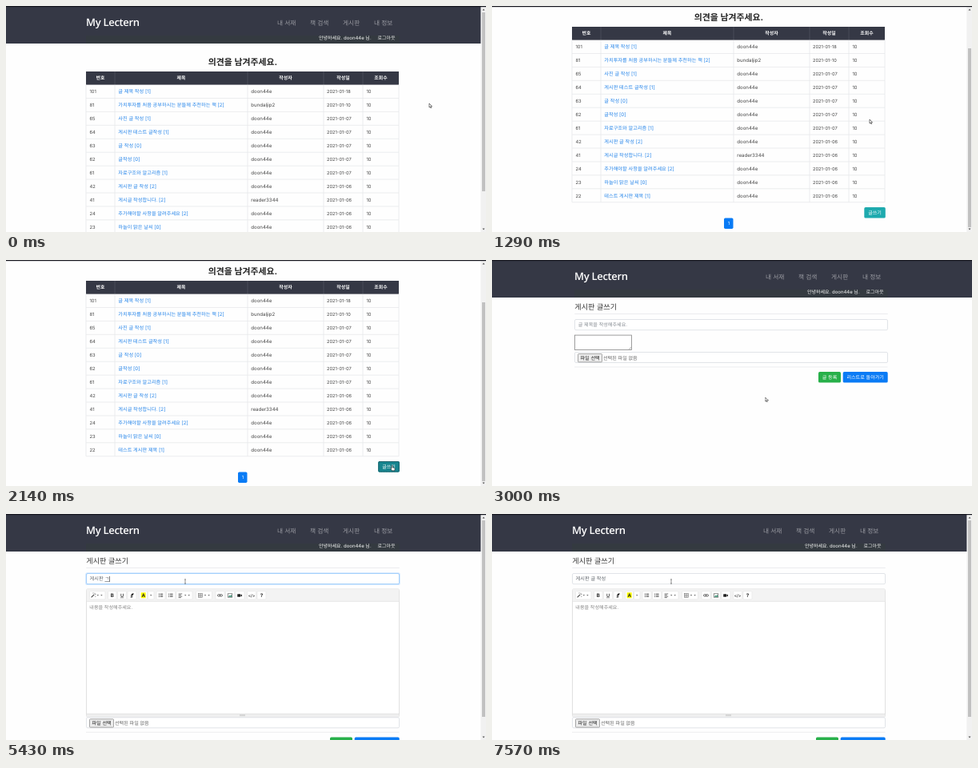
An HTML page for the animation above (8000 ms loop, 600 px wide and 283 px high).

```html
<!DOCTYPE html>
<html lang="ko">
<head>
<meta charset="utf-8">
<title>게시판 글쓰기</title>
<style>
html, body { margin: 0; width: 100%; height: 100%; overflow: hidden; background: #fefefe; }
svg { display: block; width: 600px; height: 283px; }
text {
  font-family: Inter, "Noto Sans CJK KR", "Noto Sans CJK", "Noto Sans KR", sans-serif;
  text-rendering: geometricPrecision;
  white-space: pre;
}
.brand { font-family: "Open Sans", "Noto Sans", sans-serif; font-weight: 600; letter-spacing: -.3px; }

/* 56 steps per loop; the small negative delay keeps each change on time */
.anim, .scene { animation: 8s step-end -5ms infinite; }
#list { animation-name: list; }
#plain { animation-name: plain; }
#editor { animation-name: editor; }
#page { animation-name: scroll; }
#thumb { animation-name: thumb; }
#hover { animation-name: hover; }
#focus { animation-name: focus; }
#bodyCaret { animation-name: bodyCaret; }
#pointer { animation-name: move; }
#arrow { animation-name: arrow; }
#hand { animation-name: hand; }
#beam { animation-name: beam; }

@keyframes list { 0% { opacity: 1 } 33.929%, 100% { opacity: 0 } }
@keyframes plain { 0% { opacity: 0 } 33.929% { opacity: 1 } 41.071%, 100% { opacity: 0 } }
@keyframes editor { 0% { opacity: 0 } 41.071%, 100% { opacity: 1 } }
@keyframes scroll {
  0% { transform: translateY(0) }
  10.714% { transform: translateY(0); animation-timing-function: steps(3) }
  16.071%, 100% { transform: translateY(-56px) }
}
@keyframes thumb {
  0% { transform: translateY(0) }
  10.714% { transform: translateY(0); animation-timing-function: steps(3) }
  16.071%, 100% { transform: translateY(45px) }
}
@keyframes hover { 0% { opacity: 0 } 25% { opacity: 1 } 33.929%, 100% { opacity: 0 } }
@keyframes focus {
  0% { opacity: 0 } 44.643% { opacity: 1 }
  87.5% { opacity: .7 } 89.286% { opacity: .3 } 91.071%, 100% { opacity: 0 }
}
@keyframes bodyCaret { 0% { opacity: 0 } 87.5% { opacity: 1 } 94.643%, 100% { opacity: 0 } }
@keyframes move {
  0% { transform: translate(529px, 122px); animation-timing-function: steps(7) }
  12.5% { transform: translate(472px, 142px) }
  16.071% { transform: translate(472px, 142px); animation-timing-function: steps(5) }
  25% { transform: translate(482px, 257px) }
  28.571% { transform: translate(482px, 257px); animation-timing-function: steps(5) }
  37.5% { transform: translate(341.5px, 172px); animation-timing-function: steps(4) }
  44.643%, 100% { transform: translate(224px, 84.5px) }
}
@keyframes arrow {
  0% { opacity: 1 } 25% { opacity: 0 } 30.357% { opacity: 1 } 44.643%, 100% { opacity: 0 }
}
@keyframes hand { 0% { opacity: 0 } 25% { opacity: 1 } 30.357%, 100% { opacity: 0 } }
@keyframes beam { 0% { opacity: 0 } 44.643%, 100% { opacity: 1 } }
</style>
</head>
<body>
<svg id="stage" viewBox="0 0 600 283"></svg>
<script>
const DARK = '#353845', BLUE = '#0a7bf5', GREEN = '#28b04a', LINE = '#e4e5e8', FIELD = '#dadee2';
const USER = 'doon44e';

const rect = (x, y, w, h, fill, more = '') =>
  `<rect x="${x}" y="${y}" width="${w}" height="${h}" fill="${fill}" ${more}/>`;
const text = (x, y, s, size = 6.1, fill = '#444', more = '') =>
  `<text x="${x}" y="${y}" font-size="${size}" fill="${fill}" ${more}>${s}</text>`;
const path = (d, stroke, more = '') => `<path d="${d}" fill="none" stroke="${stroke}" ${more}/>`;
const mid = 'text-anchor="middle"';
const box = (x, y, w, h, stroke = FIELD, fill = '#fff', r = 1.5) =>
  rect(x + .5, y + .5, w - 1, h - 1, fill, `stroke="${stroke}" stroke-width=".8" rx="${r}"`);
const button = (x, y, w, label, fill) =>
  rect(x, y, w, 13.6, fill, 'rx="1.7"') + text(x + w / 2, y + 9, label, 6.1, '#fff', mid);

function header(dx, width) {
  const nav = [[339, '내 서재'], [380, '책 검색'], [421, '게시판'], [460, '내 정보']];
  return rect(0, 0, width, 47, DARK) + rect(100 + dx, 37, 391.5, 10, '#343a40') +
    text(100 + dx, 25, 'My Lectern', 13, '#fff', 'class="brand"') +
    nav.map(([x, s]) => text(x + dx, 23.6, s, 7.7, '#9b9ca3')).join('') +
    text(391 + dx, 42, `안녕하세요. ${USER} 님.`, 6, '#fff') +
    text(464.5 + dx, 42, '로그아웃', 6, '#e8e8ea');
}

function scrollbar(thumb) {
  return rect(593.4, 0, 6.6, 283, '#f1f1f1') + thumb +
    '<path d="M595.5 5.5h3l-1.5-2zM595.5 278.5h3l-1.5 2z" fill="#555"/>';
}

function table() {
  const cols = [100, 136, 302, 397, 446, 491];
  const top = 98.6, pitch = 16.93;
  const rows = [
    [101, '글 제목 작성 [1]', 18], [81, '가치투자를 처음 공부하시는 분들께 추천하는 책 [2]', 10, 'bundaljip2'],
    [65, '사진 글 작성 [1]', 7], [64, '게시판 테스트 글작성 [1]', 7], [63, '글 작성 [0]', 7],
    [62, '글작성 [0]', 7], [61, '자료구조와 알고리즘 [1]', 7], [42, '게시판 글 작성 [2]', 6],
    [41, '게시글 작성합니다. [2]', 6, 'reader3344'], [24, '추가해야할 사항을 알려주세요 [2]', 6],
    [23, '하늘이 맑은 날씨 [0]', 6], [22, '테스트 게시판 제목 [1]', 6]
  ];
  const bottom = top + pitch * rows.length;
  let out = rect(100, 82, 391, 16.6, DARK);
  ['번호', '제목', '작성자', '작성일', '조회수'].forEach((s, i) => {
    out += text((cols[i] + cols[i + 1]) / 2, 92.3, s, 5.9, '#fff', mid + ' font-weight="700"');
  });
  out += path(cols.slice(1, 5).map(x => `M${x} 82V${top}`).join(''), '#565966', 'stroke-width=".6"');
  rows.forEach(([no, title, day, who = USER], i) => {
    const y = top + pitch * i + 10.7;
    out += text(104.5, y, no, 5.8) + text(140.3, y, title, 6.2, '#2585ea') + text(306.3, y, who) +
      text(401, y, '2021-01-' + String(day).padStart(2, '0'), 5.7) + text(450.4, y, 10, 5.8) +
      path(`M100 ${y + 6.2}H491`, LINE, 'stroke-width=".7"');
  });
  return out + path(cols.map(x => `M${x} ${top}V${bottom}`).join(''), LINE, 'stroke-width=".7"');
}

function listScene() {
  return `<g id="page" class="anim">` + header(0, 594) +
    text(296, 74, '의견을 남겨주세요.', 10.9, '#222', mid + ' font-weight="700"') + table() +
    button(465.3, 308, 26.5, '글쓰기', '#1eaaae') +
    `<g id="hover" class="anim">` + button(465.3, 308, 26.5, '글쓰기', '#17858f') +
    rect(465.8, 308.5, 25.5, 12.6, 'none', 'rx="1.5" stroke="#22333c" stroke-width=".9" stroke-dasharray="1 1"') + '</g>' +
    rect(290, 321.4, 11.5, 13.6, BLUE, 'rx="1.7"') + text(295.8, 330.3, '1', 5.6, '#fff', mid) + '</g>' +
    scrollbar(rect(595, 8, 4, 224, '#c1c1c1', 'id="thumb" class="anim"'));
}

const heading = x =>
  text(x, 62, '게시판 글쓰기', 9.1, '#333') + path(`M${x} 67.5H${x + 391.5}`, LINE, 'stroke-width=".7"');

const filePicker = (x, y) => box(x, y, 392, 14) +
  box(x + 4, y + 2, 31, 11.3, '#949494', '#ececec', .8) +
  text(x + 19.6, y + 9.6, '파일 선택', 6.1, '#222', mid) +
  text(x + 36, y + 9.5, '선택된 파일 없음', 6.1, '#666') +
  path(`M${x} ${y + 19}H${x + 391.5}`, LINE, 'stroke-width=".7"');

const submitRow = (x, y) =>
  button(x + 305, y, 28, '글 등록', GREEN) + button(x + 335.7, y, 56, '리스트로 돌아가기', BLUE);

function plainScene() {
  return header(3, 600) + heading(103.3) + box(103, 74, 392, 14.2) +
    text(107.8, 83.2, '글 제목을 작성해주세요.', 6.1, '#858b91') +
    box(103, 93.6, 72, 19.4, '#858585', '#fff', 0) +
    path('M171 111.8l2.8-2.8M172.6 111.8l1.2-1.2', '#777', 'stroke-width=".5"') +
    filePicker(103, 115) + submitRow(103, 140);
}

function toolbar() {
  const ink = '#444';
  const groups = [[104, 20.5], [127, 11.5], [139, 12], [151.5, 12], [166, 11], [177, 8.5], [187.5, 12],
    [200, 12], [212.5, 21], [237, 21], [261.5, 12], [274, 12], [286.5, 12], [301, 12], [313.5, 12]];
  const down = x => `<path d="M${x} 101.2h2.4l-1.2 1.4z" fill="${ink}"/>`;
  const bars = (x, widths) => widths.map((w, i) => rect(x, 99.6 + i * 1.6, w, .7, ink)).join('');
  const dots = x => [0, 1, 2].map(i => rect(x, 99.5 + i * 1.8, 1, 1, ink)).join('');
  const bullets = x => dots(x) + [0, 1, 2].map(i => rect(x + 1.8, 99.6 + i * 1.8, 3.6, .8, ink)).join('');
  const bold = mid + ' font-weight="700"';
  return groups.map(([x, w]) => box(x, 96.2, w, 11.2, '#e9e9e9', '#fff', 1)).join('') +
    path('M106.6 104.4l3.6-3.6', ink, 'stroke-width="1.1"') +
    path('M111 98.8v1.4M112.5 100.8h-1.4M108.4 99h1.2M111.8 103v1', ink, 'stroke-width=".6"') +
    down(113.6) + down(118.2) +
    text(132.7, 104, 'B', 6.2, '#222', bold) +
    text(145, 103.6, 'U', 5.8, ink, bold + ' text-decoration="underline"') +
    `<path d="M155.6 102.4l2-2.8h2.4l-2 2.8zM155.4 104.4h2.4l.8-1.2h-2.4z" fill="#222"/>` +
    rect(168.7, 98.3, 6, 7, '#ff0') + text(171.7, 104.1, 'A', 6, '#222', bold) + down(180) +
    bullets(190.8) + bullets(203.2) + bars(215.6, [4.6, 3.2, 4.6, 3.2]) + down(223) + down(227.5) +
    rect(240.3, 99.7, 5, 4.6, 'none', 'stroke="#777" stroke-width=".6"') +
    path('M240.3 101.2h5M240.3 102.8h5M242 99.7v4.6M243.7 99.7v4.6', '#777', 'stroke-width=".5"') +
    down(247.8) + down(252.4) +
    rect(264.5, 100.7, 3.4, 2.4, 'none', `rx="1.2" stroke="${ink}" stroke-width=".8"`) +
    rect(267.1, 100.7, 3.4, 2.4, 'none', `rx="1.2" stroke="${ink}" stroke-width=".8"`) +
    rect(277.2, 99.8, 5.6, 4.4, 'none', `stroke="${ink}" stroke-width=".6"`) +
    '<path d="M277.8 103.8l1.6-2 1 1 1.2-1.8 1 2.8z" fill="#2d8a6a"/>' +
    rect(289.2, 100.3, 4, 3.4, '#222', 'rx=".5"') + `<path d="M293 102l2-1.5v3z" fill="#222"/>` +
    text(307, 103.9, '&lt;/&gt;', 4.8, ink, bold) + text(319.5, 104.2, '?', 6.3, '#222', bold);
}

function editorScene() {
  return header(0, 594) + heading(100.3) + box(100, 74, 392, 14.2) +
    `<g id="focus" class="anim">` +
    rect(99.8, 73.8, 392.4, 14.6, 'none', 'rx="2" stroke="#d3e8ff" stroke-width="1.2"') +
    rect(100.5, 74.5, 391, 13.2, 'none', 'rx="1.5" stroke="#94c8fd" stroke-width=".8"') + '</g>' +
    `<text id="typed" x="104.6" y="83.2" font-size="6.2"></text>` +
    rect(0, 78, .6, 7, '#222', 'id="caret"') +
    box(100, 93.5, 392, 161, '#d9d9d9') + rect(100.8, 94.3, 390.4, 14.9, '#f3f3f3') +
    path('M100.5 109.4H491.5', '#e0e0e0', 'stroke-width=".7"') + toolbar() +
    text(104.3, 119.2, '내용을 작성해주세요.', 6.1, '#858585') +
    rect(104.3, 113.5, .7, 7.2, '#222', 'id="bodyCaret" class="anim"') +
    rect(100.8, 250.3, 390.4, 3.6, '#efefef') +
    path('M100.5 250.3H491.5', '#dadada', 'stroke-width=".7"') +
    path('M292 251.6h7M292 252.7h7', '#b5b5b5', 'stroke-width=".5"') +
    filePicker(100, 254.3) + submitRow(100, 279.4) + scrollbar(rect(595, 8, 4, 246, '#c1c1c1'));
}

function pointer() {
  const skin = 'fill="#fff" stroke="#222" stroke-width=".6" stroke-linejoin="round"';
  return `<g id="pointer" class="anim">
    <path id="arrow" class="anim" d="M0 0v5l1.1-1 .8 1.8 .8-.4-.7-1.7h1.5z" ${skin}/>
    <path id="hand" class="anim" d="M0 .6q.6-.9 1.2 0v2.2l2.6.7q.5.3.3 1.2l-.5 2.1h-3l-2-2.7q.2-.8 1.4.2z" ${skin}/>
    <path id="beam" class="anim" d="M-1-2.6h2M0-2.6v5.2M-1 2.6h2" fill="none" stroke="#444" stroke-width=".6"/>
  </g>`;
}

const scene = (id, body) => `<g id="${id}" class="scene">${rect(0, 0, 600, 283, '#fefefe')}${body}</g>`;
document.getElementById('stage').innerHTML =
  scene('list', listScene()) + scene('plain', plainScene()) + scene('editor', editorScene()) +
  rect(0, 0, 600, 1.2, '#16171f') + pointer();

// Each entry: step at which the title field gets this content
const keys = [
  [33, 'ㄱ'], [34, '게'], [35, '게시'], [36, '게시판'], [37, '게시판 '],
  [38, '게시판 ㄱ'], [39, '게시판 그'], [40, '게시판 글'], [42, '게시판 글 '], [43, '게시판 글 ㅈ'],
  [44, '게시판 글 자'], [45, '게시판 글 작'], [46, '게시판 글 작ㅅ'], [47, '게시판 글 작서'], [48, '게시판 글 작성']
];
const typed = document.getElementById('typed');
const caret = document.getElementById('caret');
const start = performance.now();
let shown = -1;

function tick() {
  const step = Math.floor((performance.now() - start + 5) % 8000 * 56 / 8000);
  if (step !== shown) {
    shown = step;
    const key = keys.filter(([at]) => at <= step).pop();
    const value = key ? key[1] : '';
    const typing = key && step < 49;
    const blink = step >= 25 && step < 29;
    const composing = typing && !value.endsWith(' ');
    typed.setAttribute('fill', key ? '#5f656b' : '#858b91');
    typed.innerHTML = !key ? '글 제목을 작성해주세요.' : composing
      ? `${value.slice(0, -1)}<tspan text-decoration="underline">${value.slice(-1)}</tspan>` : value;
    caret.setAttribute('x', 104.8 + (key ? typed.getComputedTextLength() : 0));
    caret.setAttribute('opacity', typing || blink ? 1 : 0);
  }
  requestAnimationFrame(tick);
}
tick();
</script>
</body>
</html>
```
